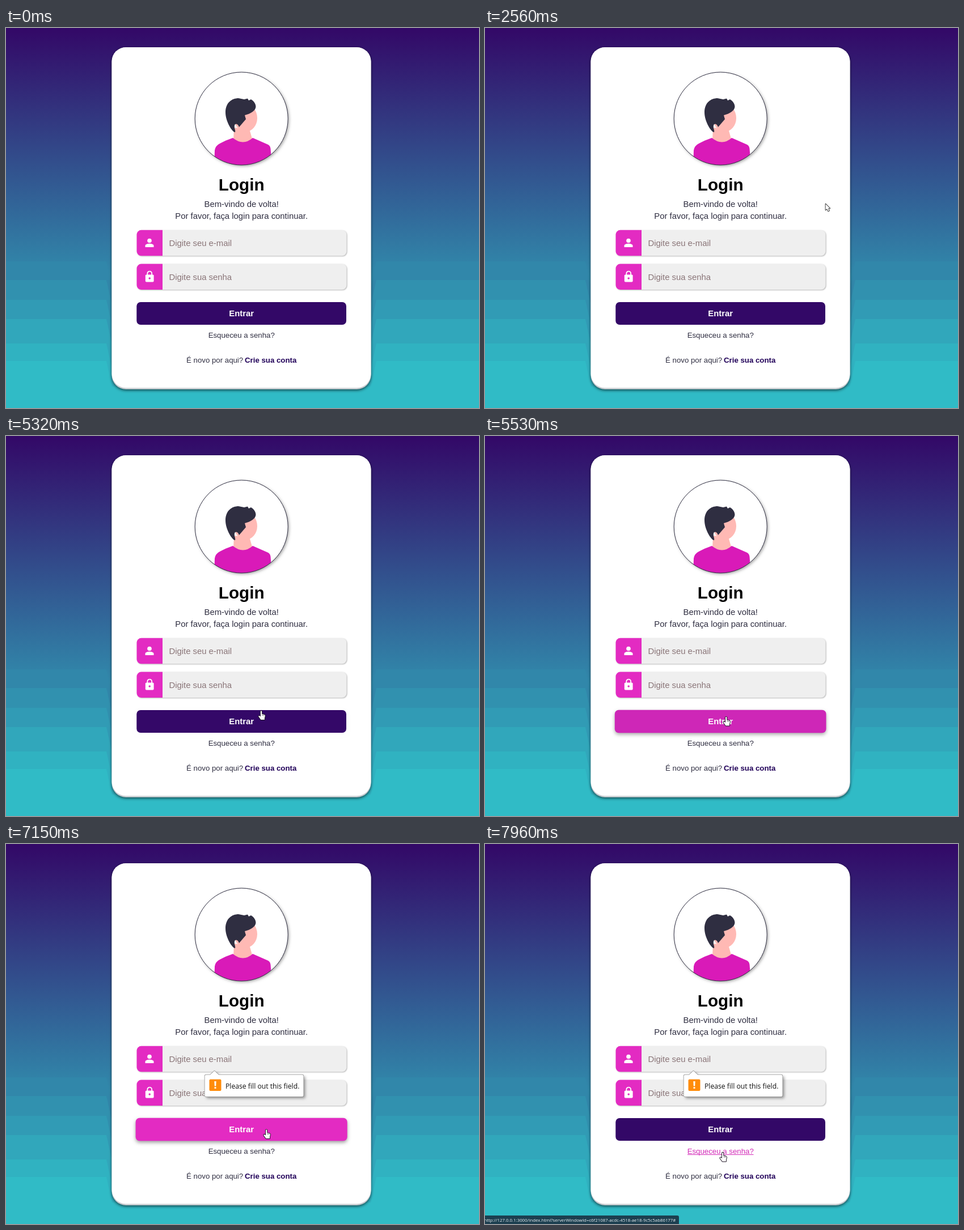
These frames come from a looping animation (834 by 671 pixels, 8 s). An HTML page with a canvas:

```html
<!DOCTYPE html>
<html lang="pt-BR">
<head>
<meta charset="utf-8">
<title>Login</title>
<style>
html, body { margin: 0; width: 100%; height: 100%; overflow: hidden; background: #330867; }
canvas { display: block; width: 834px; height: 671px; }
</style>
</head>
<body>
<canvas id="stage" width="834" height="671"></canvas>
<script>
const W = 834, H = 671, LOOP = 8000;
const PINK = [227, 43, 194], PURPLE = [51, 8, 103];
const SANS = '"Liberation Sans", Arial, sans-serif';
const UI = '"Open Sans", "Noto Sans", sans-serif';
const ctx = document.getElementById('stage').getContext('2d');

const rgb = c => `rgb(${c.map(Math.round)})`;
const clamp = v => Math.max(0, Math.min(1, v));
const mix = (a, b, k) => a + (b - a) * k;
const mixColor = (a, b, k) => a.map((v, i) => mix(v, b[i], k));
const easeOut = k => 1 - Math.pow(1 - k, 2.6);
const smooth = k => k * k * (3 - 2 * k);
const during = (t, a, b) => t >= a && t < b;

// Pointer path: time, x, y of the hot spot
const path = [
  [70, 151, 366], [770, 600, 310], [2560, 600, 310], [3170, 532.5, 382.5],
  [3980, 532.5, 382.5], [4320, 506, 442.5], [5120, 506, 442.5], [5320, 450, 485],
  [5530, 425, 495.5], [5740, 426, 504], [6820, 426, 504], [6990, 470, 498],
  [7150, 459, 504], [7560, 446, 523], [7630, 440, 525], [7890, 419, 544.5], [8000, 419, 544.5]
];

function pointerAt(t) {
  let i = 0;
  while (i < path.length - 2 && t >= path[i + 1][0]) i++;
  const [t0, x0, y0] = path[i], [t1, x1, y1] = path[i + 1];
  const span = clamp((t - t0) / (t1 - t0));
  const k = t < 5120 ? smooth(span) : span;
  return { x: mix(x0, x1, k), y: mix(y0, y1, k) };
}

function rounded(x, y, w, h, r, fill) {
  ctx.beginPath();
  ctx.roundRect(x, y, w, h, r);
  ctx.fillStyle = fill;
  ctx.fill();
}

function withShadow(color, blur, dx, dy, draw) {
  ctx.save();
  ctx.shadowColor = color;
  ctx.shadowBlur = blur;
  ctx.shadowOffsetX = dx;
  ctx.shadowOffsetY = dy;
  draw();
  ctx.restore();
}

function text(str, x, y, font, color, align = 'left') {
  ctx.font = font;
  ctx.fillStyle = color;
  ctx.textAlign = align;
  ctx.fillText(str, x, y);
}

function shape(d, fill, stroke, width = 1) {
  const p = new Path2D(d);
  if (stroke) {
    ctx.strokeStyle = stroke;
    ctx.lineWidth = width;
    ctx.lineJoin = 'round';
    ctx.stroke(p);
  }
  if (fill) {
    ctx.fillStyle = fill;
    ctx.fill(p);
  }
}

function background() {
  const g = ctx.createLinearGradient(0, 0, 0, H);
  g.addColorStop(0, rgb(PURPLE));
  g.addColorStop(1, '#30cfd0');
  ctx.fillStyle = g;
  ctx.fillRect(0, 0, W, H);
  // Lower steps, bent down beside the card
  const edges = [412, 445, 480, 514, 557, 588];
  edges.forEach((y, i) => {
    const k = i === 5 ? 0.9 : ((y + edges[i + 1]) / 2) / H;
    ctx.fillStyle = rgb(mixColor(PURPLE, [48, 207, 208], k));
    ctx.beginPath();
    ctx.moveTo(0, y);
    ctx.lineTo(177, y);
    ctx.lineTo(187, y + 45);
    ctx.lineTo(643, y + 45);
    ctx.lineTo(653, y);
    ctx.lineTo(W, y);
    ctx.lineTo(W, H);
    ctx.lineTo(0, H);
    ctx.fill();
  });
}

function card() {
  withShadow('rgba(0,0,0,.6)', 5, 0, 2, () => rounded(186.5, 34, 457, 604, 25, '#c8cbd0'));
  rounded(186.5, 34, 457, 601.5, 25, '#fff');
}

function avatar() {
  const disc = () => {
    ctx.beginPath();
    ctx.arc(415.2, 160, 82, 0, Math.PI * 2);
  };
  ctx.fillStyle = '#fff';
  withShadow('rgba(0,0,0,.35)', 5, 2, 2, () => { disc(); ctx.fill(); });
  ctx.save();
  disc();
  ctx.clip();
  shape('M402 176L401 198Q418 210 435 199L429 178Z', '#ffb9b4');
  shape('M367 245L368 216Q369 208 377 204Q388 198 400 194Q418 209 435 194L460 205Q466 207 466.500 213L469 245Z', '#d91ab8');
  ctx.beginPath();
  ctx.ellipse(422.5, 159, 20.5, 24, 0, 0, Math.PI * 2);
  ctx.fillStyle = '#ffb9b4';
  ctx.fill();
  shape('M404 184C399 184 387 165 387 149C387 132 398 124 410 124L420 126L426 124.500L428 128L432 126C437 129 440.500 134 440.500 139C440 146 432 151 421 154L423 161L411 175C409 169 404 168 403 172C402 177 405 180 404 184Z', '#2f2e41');
  ctx.restore();
  disc();
  ctx.strokeStyle = '#2f2e41';
  ctx.lineWidth = 1;
  ctx.stroke();
}

function field(y, hint) {
  withShadow('rgba(0,0,0,.28)', 2, 1, 1, () => rounded(230.5, y, 370, 45.5, 8, '#efefef'));
  rounded(230.5, y, 45.5, 45.5, [8, 0, 0, 8], rgb(PINK));
  text(hint, 287.4, y + 28, '14.86px ' + SANS, '#8a7578');
}

function icons() {
  ctx.fillStyle = '#fff';
  ctx.beginPath();
  ctx.arc(253, 375.5, 3.8, 0, Math.PI * 2);
  ctx.fill();
  shape('M245.500 387V384.500C245.500 379.500 260.500 379.500 260.500 384.500V387Z', '#fff');
  rounded(245.8, 435.5, 14.8, 13, 1.8, '#fff');
  shape('M249.300 436V433.500A3.900 3.900 0 0 1 257.100 433.500V436', null, '#fff', 1.8);
  ctx.fillStyle = rgb(PINK);
  ctx.beginPath();
  ctx.arc(253.2, 442, 1.8, 0, Math.PI * 2);
  ctx.fill();
}

function button(k) {
  const fill = rgb(mixColor(PURPLE, PINK, k)), grow = 1.7 * k;
  withShadow(`rgba(0,0,0,${0.38 * k})`, 6, 0, 3, () =>
    rounded(230.3 - grow, 484 - 0.2 * k, 369.7 + grow * 2, 40 + 0.4 * k, 7, fill));
  text('Entrar', 415.2, 508.7, 'bold 14.86px ' + SANS, '#fff', 'center');
}

function links(hover) {
  const font = '13.25px ' + SANS, color = hover ? '#d32bb8' : '#2f2e41';
  text('Esqueceu a senha?', 415.2, 546.5, font, color, 'center');
  if (hover) {
    ctx.fillStyle = color;
    ctx.fillRect(357, 548, 116.5, 1);
  }
  text('É novo por aqui? ', 318, 591.3, font, '#2f2e41');
  text('Crie sua conta', 421, 591.3, 'bold ' + font, '#200058');
}

function tooltip(alpha) {
  if (!alpha) return;
  ctx.save();
  ctx.globalAlpha = alpha;
  const d = 'M353 407.500H360L367.500 400.500L375 407.500H522Q524.500 407.500 524.500 410V443.500Q524.500 446 522 446H353Q350.500 446 350.500 443.500V410Q350.500 407.500 353 407.500Z';
  withShadow('rgba(0,0,0,.4)', 5, 3, 3, () => shape(d, '#fff'));
  shape(d, '#fff', '#8b8b8b', 1.4);
  rounded(358.5, 415.5, 21, 20.5, 2, '#ff8c0a');
  shape('M367.300 419H370.700L370.200 427.500H367.800Z', '#fff');
  ctx.fillRect(367.5, 429.2, 3, 2.6);
  text('Please fill out this field.', 387, 431.5, '12.2px ' + UI, '#111');
  ctx.restore();
}

function statusBar() {
  rounded(-4, 656, 346, 18, [0, 3, 0, 0], '#1c3f50');
  text('http://127.0.0.1:3000/index.html?serverWindowId=c6f21087-acdc-4518-ae18-9c5c5ab86177#',
    -1.5, 666.7, '7.83px ' + UI, '#eef3f5');
}

function pointerKind(t, p) {
  if (t >= 5300) return 'hand';
  const inside = (x0, y0, x1, y1) => p.x > x0 && p.x < x1 && p.y > y0 && p.y < y1;
  const overText = inside(276, 357, 600, 402) || inside(276, 417, 600, 462) || inside(300, 322, 530, 341);
  return overText ? 'beam' : 'arrow';
}

function pointer(t) {
  const p = pointerAt(t);
  if (during(t, 3400, 3520) || during(t, 4590, 4720) || during(t, 6000, 6130)) {
    ctx.fillStyle = 'rgba(255,255,0,.47)';
    ctx.beginPath();
    ctx.arc(p.x, p.y, 11, 0, Math.PI * 2);
    ctx.fill();
  }
  ctx.save();
  ctx.translate(p.x, p.y);
  const kind = pointerKind(t, p);
  if (kind === 'arrow') {
    shape('M.5 .5V11.500L3 9.200L5 13.500L7 12.600L5.100 8.500H8.300Z', '#fff', '#111', 1.6);
  } else if (kind === 'beam') {
    const d = 'M-3.500 -5.500H-1L0 -5L1 -5.500H3.500M0 -5V5M-3.500 5.500H-1L0 5L1 5.500H3.500';
    shape(d, null, 'rgba(255,255,255,.8)', 3);
    shape(d, null, '#333', 1.4);
  } else {
    shape('M-1 1Q0 -.5 1.300 1V6L5.500 7Q7 7.500 7 9L6 13.500V16H-.5L-4.500 10.500Q-5 8.500 -3 9L-1 10.500Z', '#fff', '#1a1020', 1.8);
    shape('M2.500 9V7M4.700 9.300V7.500', null, '#1a1020', 0.7);
  }
  ctx.restore();
}

function caret(t) {
  const second = during(t, 4660, 5160) || during(t, 5660, 6060);
  const first = during(t, 6200, 6700) || during(t, 7200, 7700);
  ctx.fillStyle = '#222';
  if (second) ctx.fillRect(287, 431, 1, 17);
  if (first) ctx.fillRect(287, 371, 1, 17);
}

function draw(t) {
  background();
  card();
  avatar();
  text('Login', 415.2, 287, 'bold 29.7px ' + SANS, '#000', 'center');
  text('Bem-vindo de volta!', 415.2, 316, '14.86px ' + SANS, '#2f2e41', 'center');
  text('Por favor, faça login para continuar.', 415.2, 336.5, '14.86px ' + SANS, '#2f2e41', 'center');
  field(356.8, 'Digite seu e-mail');
  field(416.6, 'Digite sua senha');
  icons();
  caret(t);
  button(easeOut(clamp((t - 5320) / 380)) - easeOut(clamp((t - 7610) / 340)));
  links(t >= 7760);
  tooltip(clamp((t - 6070) / 200));
  if (t >= 7890) statusBar();
  if (t >= 70) pointer(t);
}

function tick() {
  draw(performance.now() % LOOP);
  requestAnimationFrame(tick);
}
tick();
</script>
</body>
</html>
```
